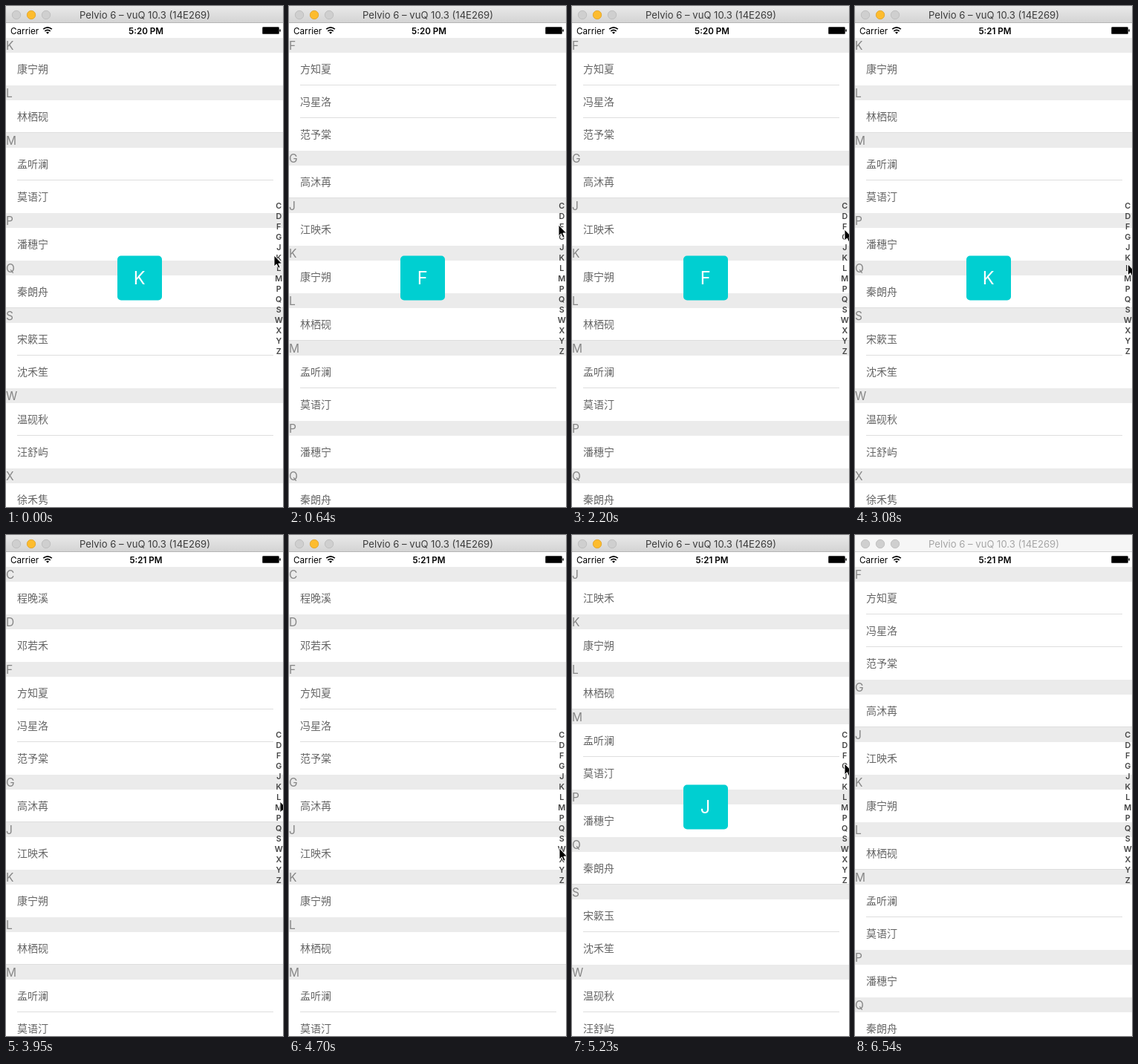
An HTML page that plays this animation: 373x675 px, repeating every 6.59 s.

```html
<!DOCTYPE html>
<html lang="zh">
<head>
<meta charset="utf-8">
<title>Indexed contact list</title>
<style>
html, body { margin: 0; width: 100%; height: 100%; overflow: hidden; background: #fff; }
svg { display: block; width: 373px; height: 675px; font-family: Inter, "Liberation Sans", sans-serif; }
.row { font: 14px "Noto Sans CJK SC", "Noto Sans CJK", "Noto Sans CJK JP", sans-serif; fill: #666; }
.head { font-size: 15.5px; fill: #868686; }
.index { font-size: 10.8px; font-weight: 600; fill: #454545; text-anchor: middle; }
</style>
</head>
<body>
<svg viewBox="0 0 373 675">
  <defs>
    <linearGradient id="chrome" x2="0" y2="1">
      <stop stop-color="#e9e9e9"/><stop offset="1" stop-color="#d3d3d3"/>
    </linearGradient>
  </defs>
  <rect width="373" height="675" fill="#fff"/>
  <g id="list"></g>
  <g id="index" class="index"></g>
  <g id="popup">
    <rect x="150" y="336.5" width="60" height="60" rx="5" fill="#00cfd1"/>
    <text id="letter" x="179.6" y="375.3" font-size="23.6" fill="#fff" text-anchor="middle"></text>
  </g>
  <g id="status">
    <rect y="23" width="373" height="20" fill="#fff"/>
    <text x="6" y="37.5" font-size="11.7">Carrier</text>
    <g fill="none" stroke="#000" stroke-width="1.7">
      <path d="M50.2 31.2q5.8-4.8 11.6 0M52.3 33.8q3.7-3 7.4 0"/>
      <path d="M56 37.8l-2-2.2q2-1.6 4 0z" fill="#000" stroke="none"/>
    </g>
    <text id="clock" x="188.5" y="37.5" font-size="11.6" font-weight="600" text-anchor="middle"></text>
    <rect x="345" y="28" width="23" height="10" rx="1.6" fill="#444"/>
    <rect x="346" y="29" width="21" height="8" rx=".8"/>
    <rect x="368.3" y="31.2" width="1.5" height="3.6" rx=".7"/>
  </g>
  <g id="bar">
    <rect id="barFill" width="373" height="23"/>
    <rect id="barEdge" y="22" width="373" height="1"/>
    <g stroke-width=".8">
      <circle cx="14" cy="12" r="5.7" fill="#cfcfcf" stroke="#b9b9b9"/>
      <circle id="yellow" cx="34" cy="12" r="5.7"/>
      <circle cx="54" cy="12" r="5.7" fill="#cfcfcf" stroke="#b9b9b9"/>
    </g>
    <text id="title" x="187" y="16.8" font-size="13.1" text-anchor="middle">Pelvio 6 – vuQ 10.3 (14E269)</text>
  </g>
  <path id="cursor" d="M0 0V15L3.4 11.9L5.8 17.3L8.2 16.3L5.9 11.1H10.6Z" stroke="#fff" stroke-width="1" stroke-linejoin="round"/>
</svg>
<script>
const LOOP = 6590, TOP = 43, HEAD = 20, ROW = 44, VIEW = 647;
const INDEX_TOP = 262, STEP = 14, LAG = 45;
const RELEASE = 3700, PRESS = 4870, END = 5600;
const RULED = 'GLQ'; // sections closed by a full-width line

const sections = Object.entries({
  C: '程晚溪', D: '邓若禾', F: '方知夏 冯星洛 范予棠', G: '高沐苒', J: '江映禾',
  K: '康宁朔', L: '林栖砚', M: '孟听澜 莫语汀', P: '潘穗宁', Q: '秦朗舟',
  S: '宋簌玉 沈禾笙', W: '温砚秋 汪舒屿', X: '徐禾隽 许沁棠 谢朝汐 肖念湄',
  Y: '叶槿之 姚溪宁 袁牧遥 严若汀 于澈言', Z: '周砚棠 郑漪然'
}).map(([key, names]) => ({ key, names: names.split(' ') }));

// Pointer tip: time, x, y
const path = [
  [0, 361, 336], [120, 361, 336], [640, 363, 295], [750, 364, 284], [810, 364, 284],
  [1390, 366, 408], [1810, 366, 408], [2150, 367, 302.5], [2200, 367, 301],
  [2440, 367, 303], [2560, 367, 303], [2670, 368, 299], [2850, 368, 299],
  [3290, 367, 392], [3480, 367, 350], [3540, 367, 318], [3650, 367, 266], [RELEASE, 367, 266],
  [3950, 369, 359], [4240, 369, 360], [4700, 364, 422], [PRESS, 366, 422],
  [4990, 367, 384], [5230, 367, 308], [5410, 367, 291], [END, 367, 291],
  [5760, 380, 287], [LOOP, 380, 287]
];

const $ = id => document.getElementById(id);

function add(parent, tag, attrs, text) {
  const el = document.createElementNS('http://www.w3.org/2000/svg', tag);
  for (const k in attrs) el.setAttribute(k, attrs[k]);
  if (text) el.textContent = text;
  parent.appendChild(el);
}

let total = 0;
function build() {
  const list = $('list');
  const rule = (x, width) => add(list, 'rect', { x, y: total - 1, width, height: 1, fill: '#dedede' });
  sections.forEach((s, n) => {
    s.offset = total;
    add(list, 'rect', { y: total, width: 373, height: HEAD, fill: '#ebebeb' });
    add(list, 'text', { x: 0, y: total + 16, class: 'head' }, s.key);
    total += HEAD;
    s.names.forEach((name, i) => {
      add(list, 'text', { x: 15, y: total + 27.2, class: 'row' }, name);
      total += ROW;
      if (i < s.names.length - 1) rule(15, 345);
    });
    if (RULED.includes(s.key)) rule(0, 373);
    add($('index'), 'text', { x: 367.3, y: INDEX_TOP + STEP * n + 11 }, s.key);
  });
}

function pointer(t) {
  const i = Math.max(1, path.findIndex(p => p[0] >= t));
  const [a, b] = [path[i - 1], path[i]];
  const k = Math.max(0, (t - a[0]) / (b[0] - a[0]));
  return [a[1] + (b[1] - a[1]) * k, a[2] + (b[2] - a[2]) * k];
}

function selected(t) {
  if (t > RELEASE && t < PRESS) t = RELEASE;
  const y = pointer(Math.min(t, END) - LAG)[1];
  return sections[Math.max(0, Math.floor((y - INDEX_TOP) / STEP))];
}

const fade = (t, from) => Math.min(1, Math.max(0, 1 - (t - from) / 160));

function draw(t) {
  const s = selected(t);
  const active = t < 6540;
  const [x, y] = pointer(t);
  $('list').setAttribute('transform', `translate(0 ${TOP - Math.min(s.offset, total - VIEW)})`);
  $('letter').textContent = s.key;
  $('popup').setAttribute('opacity', t < PRESS ? fade(t, RELEASE) : fade(t, END));
  $('cursor').setAttribute('transform', `translate(${x} ${y})`);
  $('clock').textContent = t < 2610 ? '5:20 PM' : '5:21 PM';
  $('barFill').setAttribute('fill', active ? 'url(#chrome)' : '#f6f6f6');
  $('barEdge').setAttribute('fill', active ? '#b5b5b5' : '#d4d4d4');
  $('yellow').setAttribute('fill', active ? '#fdbc2e' : '#cfcfcf');
  $('yellow').setAttribute('stroke', active ? '#dfa023' : '#b9b9b9');
  $('title').setAttribute('fill', active ? '#3c3c3c' : '#a6a6a6');
}

build();
const start = performance.now();
function tick() {
  draw((performance.now() - start) % LOOP);
  requestAnimationFrame(tick);
}
tick();
</script>
</body>
</html>
```
